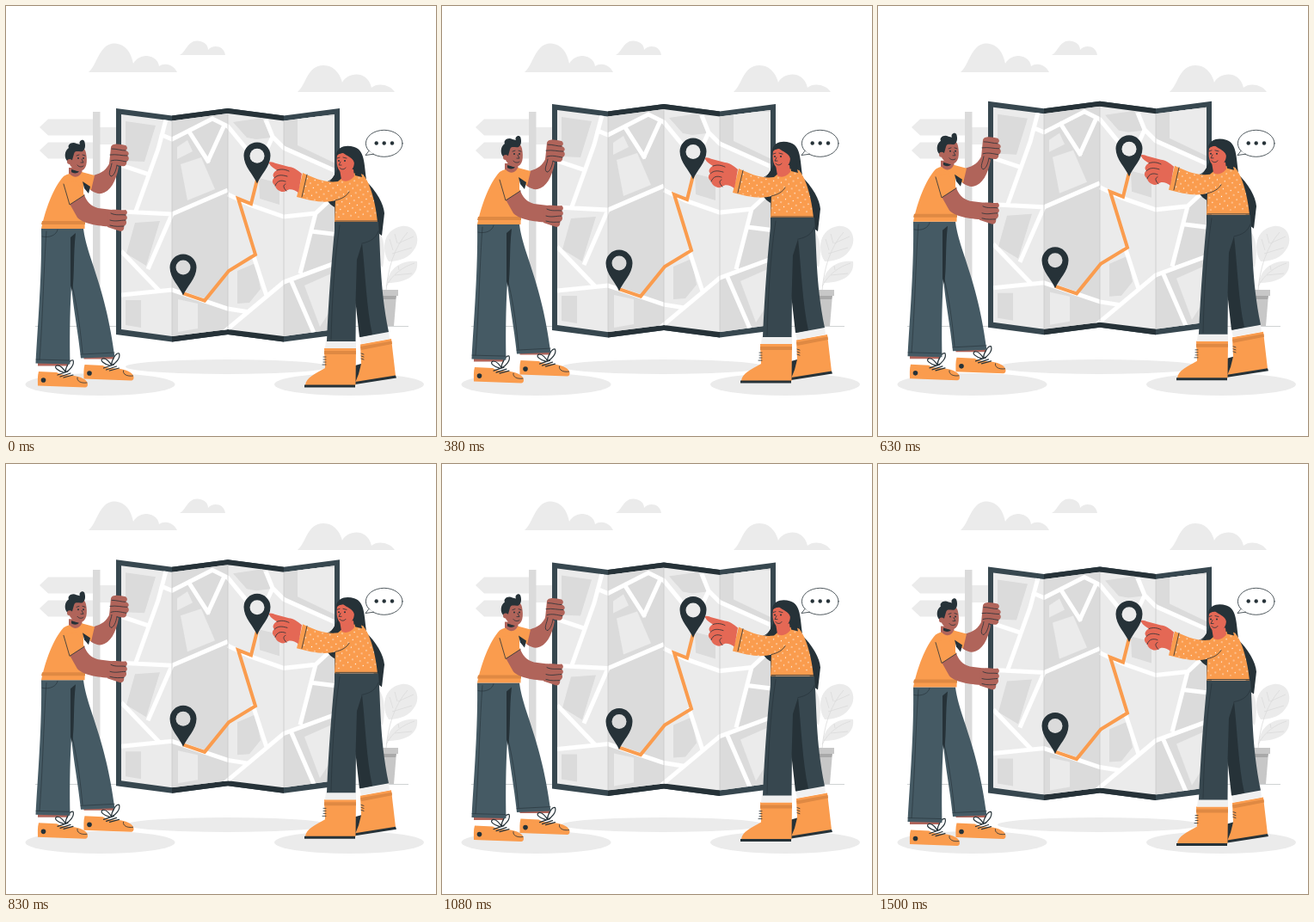
Recreate the animation shown at these times as an HTML page. Size 500 by 500 pixels, loop 1.54 s.

```html
<!DOCTYPE html>
<html lang="en">
<head>
<meta charset="utf-8">
<title>Reading a map</title>
<style>
html, body { margin: 0; width: 100%; height: 100%; overflow: hidden; background: #fff }
svg { display: block; width: 100vw; height: 100vh }
.pale { fill: #ebebeb }
.grey { fill: #dbdbdb }
.orange { fill: #fa9c4e }
.rust { fill: #df8943 }
.dark { fill: #263238 }
.slate { fill: #37474f }
.blue { fill: #455a64 }
.brown { fill: #b0645a }
.coral { fill: #e46855 }
.white { fill: #fff }
.ink, .road, .route, .leaf { fill: none }
.ink { stroke: #263238; stroke-width: .8; stroke-linecap: round; stroke-linejoin: round }
.road { stroke: #fff; stroke-width: 5 }
.route { stroke: #fa9c4e; stroke-width: 4 }
.leaf { stroke: #dbdbdb; stroke-width: .8 }
</style>
</head>
<body>
<svg viewBox="0 0 500 500">
  <defs>
    <pattern id="dots" width="9" height="9" patternUnits="userSpaceOnUse" patternTransform="rotate(12)">
      <circle cx="2" cy="2" r=".65" class="white"/><circle cx="6.5" cy="6.5" r=".65" class="white"/>
    </pattern>
    <path id="pin" d="M0 0C-4-10-15.5-20-15.5-32.5A15.5 15.5 0 0 1 15.5-32.5C15.5-20 4-10 0 0Z"/>
    <g id="shoe">
      <path class="white" d="M38 417H72L71 428H38Z"/>
      <path class="brown" d="M37 415H72V418.500H37Z"/>
      <path class="orange" d="M38 425L59 426C66 431 76 428 84 431C91 433 95 436 95 440C95 442 94 443.500 92 443.500L37 441.500C37 436 36.500 430 38 425Z"/>
      <path class="ink" d="M83 432C82 436 87 439 94 438"/>
      <path class="ink" style="stroke-width:1.200" d="M60 429L72 425M63 431L75 427M67 432L78 429M67 426C60 424 55 420 59 418C63 417 68 423 69 426C69 420 75 410 78 412C80 417 74 424 69 426"/>
      <circle class="dark" cx="43.500" cy="435" r="2.800"/>
    </g>
    <clipPath id="sheet"><path d="M134 126L193 133.500L258 125L323 133.500L382 126V376L323 384L258 376L193 384L134 376Z"/></clipPath>
  </defs>

  <!-- Scenery -->
  <g class="pale">
    <path d="M96 77C106 69 108 44 126 43.500C140 44 146 56 148 67C152 60 158 58 164 58C172 59 177 63 178 70C184 66 194 67 199 77Z"/>
    <path d="M202 57C209 54 211 40 223 40.500C231 41 235 46 235 51C240 45 253 45 255 57Z"/>
    <path d="M339 100C349 92 350 69 369 69C382 69 389 80 391 89C397 77 420 74 425 95C432 89 446 91 452 100Z"/>
    <path d="M39 141L49 131.500H101V150.500H49ZM39 168L49 158.500H101V177.500H49ZM109 141H131V161H109Z"/>
    <ellipse cx="109.500" cy="440" rx="87" ry="13"/>
    <ellipse cx="399" cy="440" rx="87" ry="13"/>
    <ellipse cx="257" cy="419.500" rx="118" ry="8.500"/>
  </g>
  <path class="grey" d="M101 123H109.500V372H101Z"/>
  <path stroke="#c4c8ca" stroke-width=".8" d="M34 372.500H468"/>
  <g class="pale">
    <path d="M445 297C436 284 438 260 460 256C476 254 482 270 476 281C470 292 459 297 445 297Z"/>
    <path d="M443 322C445 305 460 295 478 297C480 312 467 322 443 322Z"/>
    <path d="M438 304C425 290 424 266 433 262C441 270 441 290 438 304Z"/>
  </g>
  <path class="leaf" d="M442 331C444 306 451 281 467 263M450 284L446 271M455 276L452 265M449 288L472 281M456 276L474 268M442 326C449 312 462 303 475 299M452 313L472 311M457 307L456 302"/>
  <path fill="#c7c7c7" d="M433 336H454L451 372H435Z"/>
  <path fill="#a9a9a9" d="M434 337H454L453 341H434Z"/>
  <path fill="#c7c7c7" d="M430 330H456V337H430Z"/>
  <ellipse class="ink" cx="439.700" cy="159.800" rx="21.300" ry="15.500"/>
  <path class="ink" style="fill:#fff" d="M422 168.500L418 173.500L427.500 172.200"/>
  <g class="dark">
    <circle cx="430.700" cy="159.500" r="2.200"/><circle cx="439.700" cy="159.500" r="2.200"/><circle cx="449" cy="159.500" r="2.200"/>
  </g>

  <g id="float">
    <!-- Map -->
    <path class="slate" d="M128 119L193 127.500L258 119L323 127.500L388 119V382L323 390.500L258 382L193 390.500L128 382Z"/>
    <path class="dark" d="M193 127.500L258 119V382L193 390.500ZM258 119L323 127.500V390.500L258 382Z"/>
    <g clip-path="url(#sheet)">
      <path class="pale" d="M130 120H390V392H130Z"/>
      <path class="grey" d="M193 120H258V392H193ZM323 120H390V194L323 165ZM360 241L388 215V298L342 311ZM323 320L390 298V392H323Z"/>
      <path class="grey" d="M139 134L174 139L161 181L139 180ZM150 252L179 250L163 302L140 288ZM139 342H157V374L139 371ZM264 135L298 130L308 153L291 155L280 153ZM294 200L318 206V231L295 224ZM269 308L290 299L296 329L283 345L269 346Z"/>
      <path class="pale" d="M339 128H383V183L339 162ZM199 164L211 156L217 169L199 178ZM203 184L227 176L243 213L211 226ZM200 341L223 346V375L200 379ZM347 325L383 309V345L365 373Z"/>
      <path class="road" d="M186 132L177 166L150 241M134 185L164 195M134 239L193 242L258 214M193 242L165 306M134 285L179 332M134 336L193 330L258 352L283 356M179 149L193 155L240 131L258 140L286 174M211 143L236 182M255 136L234 182M258 219L283 231L323 245L360 241L388 215M302 132L310 152L323 165L388 194M310 152L297 180M360 241L342 311M355 262L388 266M250 382L323 321L388 297M331 318L358 380M287 288L303 337"/>
      <path fill="none" stroke="#c9c9c9" stroke-width=".8" d="M193 130V386M258 122V379M323 130V386"/>
    </g>
    <path class="route" d="M206 334L231 342.500L259 308L290 289L270 224L285 230L292 202"/>
    <use href="#pin" x="292" y="206.500" class="dark"/>
    <use href="#pin" x="206" y="336.500" class="dark"/>
    <circle class="pale" cx="292" cy="174.300" r="8.500"/>
    <circle class="grey" cx="206" cy="304" r="8.500"/>

    <!-- Man -->
    <use href="#shoe" x="53.500" y="-8"/>
    <use href="#shoe"/>
    <path class="blue" d="M41 259H90C94 292 116 326 126.500 408L87 409.500C84 380 78 350 76 325C74 360 74 390 74.500 416.500L34.500 415.500C37 370 42 310 41 259Z"/>
    <path class="dark" d="M75 269L81 264C78 290 80 312 77 332L75 325Z"/>
    <path class="ink" style="stroke-width:.6" d="M42 268C51 270 59 266 60 260M47 262C44 300 43 360 39 411M35 411L74 412M77 325C83 350 87 380 89 404M87 405L126 403"/>
    <path class="brown" d="M102 197C111 194 117 191 121 181L131 187C128 204 121 216 111 218C104 219 98 214 94 210Z"/>
    <path class="brown" d="M73 188H88L89 198C84 203 76 202 73 198Z"/>
    <path class="dark" d="M76 190L85 192.500C83 195 78 195 76 193Z"/>
    <path class="orange" d="M67 198C72 195 74 195 74 195C79 201 86 199 88 193L103 197L99 214L90 207V222C92 236 92 248 91.500 259H41C46 236 55 211 67 198Z"/>
    <path class="rust" d="M42 250H92V254H41Z"/>
    <path class="dark" d="M89 204L98 210L96 218L91 212Z"/>
    <path class="brown" d="M74 230L91 219C93 227 99 233 107 235L123 237L125 257C110 256 91 254 83 246Z"/>
    <path class="orange" d="M67 206L82 203L91 220L74 231Z"/>
    <path class="ink" d="M67 207L74 231L91 220"/>
    <path class="brown" d="M119 238C125 235 133 238 139 237C142 239 141 242 139 243C142 245 141 248 139 249C141 251 140 255 137 256C138 259 136 262 133 262L118 257Z"/>
    <path class="ink" d="M122 241C128 244 133 242 139 243M121 249C128 251 132 249 139 249M121 255C128 257 132 256 137 256"/>
    <path class="brown" d="M122 164C123 159 132 160 139 162C142 164 141 167 139 168C143 169 144 173 141 174C144 176 143 180 140 181C141 185 138 187 134 186L129 185C129 191 126 198 122 198C118 196 121 190 120 184Z"/>
    <path class="ink" d="M123 166C129 166 134 168 139 168M121 173C129 172 134 174 141 174M122 180C128 178 134 180 140 181M129 185C128 192 125 198 122 198C118 195 122 190 123 183"/>
    <path class="brown" d="M75 174C76 164 92 161 93 171C95 181 94 191 86 192C79 192 75 187 73 182Z"/>
    <path class="dark" d="M72 181C67 177 68 168 73 165C71 161 77 157 82 160L86 161C84 157 89 154 91 157C93 162 92 167 89 169C85 170 80 167 79 172L77 179Z"/>
    <circle class="brown" cx="74" cy="181" r="3"/>
    <circle class="dark" cx="84" cy="177" r="1"/><circle class="dark" cx="90" cy="177" r="1"/>
    <path class="ink" d="M82 174L85 173M89 173L92 174M88 178L90 182H87M83 185C85 188 89 187 90 186"/>

    <!-- Woman -->
    <path class="dark" d="M417 202C431 215 439 230 440 241L437 267L430 262Z"/>
    <path class="dark" d="M384 172C386 163 396 161 405 164C419 168 416 190 420 206C408 214 389 211 384 235C374 230 369 222 371 208C378 204 382 197 385 190Z"/>
    <path class="ink" d="M386 190C382 201 375 205 369 206"/>
    <path class="orange" d="M412 393.500L448 387L453 430L407 438V420L413 416Z"/>
    <path class="rust" d="M412 396L448.500 389.500L449 393L413 400Z"/>
    <path class="dark" d="M406 437L453 429.500L454 432.500L406 440ZM406 438V418L413 416L410 428Z"/>
    <path class="orange" d="M370 398H407L406.500 441H348C349 432 359 428 371 421Z"/>
    <path class="rust" d="M370 401H407V405H370Z"/>
    <path class="dark" d="M347 440.500H406V443.500H347Z"/>
    <path class="ink" d="M369 408H372M369 411H372M369 414H372M368 417H372M413 404L416 405M413 407L416 408M413 410L416 411"/>
    <path fill="#f0f0f0" d="M372 389H407V398H371ZM411 385L445 379L446 387L413 393Z"/>
    <path class="slate" d="M383 251H433C436 285 434 325 445 379L412 385L407 340L406.500 390H373C375 340 379 290 383 251Z"/>
    <path class="dark" d="M414 276L408 295L406.500 345L411 385L426 382C419 350 418 312 414 276Z"/>
    <path class="ink" style="stroke-width:.6" d="M433 262C430 270 424 274 414 276M388 255C381 300 379 350 378 388"/>
    <path class="orange" d="M345 194C358 200 371 206 386 204C393 197 406 191 415 196C424 206 430 230 432 251H382L383 226C370 230 353 226 338 222Z"/>
    <path fill="url(#dots)" d="M349 197C360 201 372 206 386 204C393 197 406 191 415 196C424 206 430 230 431 246H383V226C370 230 355 226 342 222Z"/>
    <path class="ink" d="M350 196L344 222M383 226C391 224 396 221 399 216M383 250H432"/>
    <path class="coral" d="M388 190H404L405 198C400 204 394 205 390 202Z"/>
    <path class="coral" d="M385 174C388 169 401 169 404 178C407 185 402 194 395 195C388 195 383 188 385 174Z"/>
    <path class="dark" d="M384 173C388 162 401 162 408 168C414 176 411 190 414 199L406 197C405 192 407 188 405 182C403 176 396 174 392 171C389 171 386 172 384 173Z"/>
    <circle class="dark" cx="387" cy="180" r="1"/><circle class="dark" cx="394" cy="180" r="1"/>
    <path class="ink" d="M385 177L388 176M392 176L396 177M389 181L387 185H390M388 188C390 191 394 190 395 188"/>
    <path class="coral" d="M306 183C305 180 310 181 314 183L329 187C334 187 339 191 344 195L340 217C335 213 329 212 326 215C321 218 314 214 313 209C309 206 309 202 312 200C309 197 311 193 315 191C312 189 308 187 306 183Z"/>
    <path class="ink" d="M315 191C320 189 325 190 329 192M312 200C316 196 320 196 327 198M313 209C315 203 320 202 325 204M326 215C322 211 322 208 325 207"/>
  </g>
</svg>
<script>
const LOOP = 1540, PEAK = 712, LIFT = 10, REST = 0.8;
const float = document.getElementById("float");

// Linear rise and fall, like a triangle wave.
function draw(now) {
  const t = now % LOOP;
  const rise = Math.abs(LIFT * (1 - Math.abs(t - PEAK) / (LOOP / 2)));
  float.setAttribute("transform", `translate(0 ${REST - rise})`);
  requestAnimationFrame(draw);
}
draw(performance.now());
</script>
</body>
</html>
```
